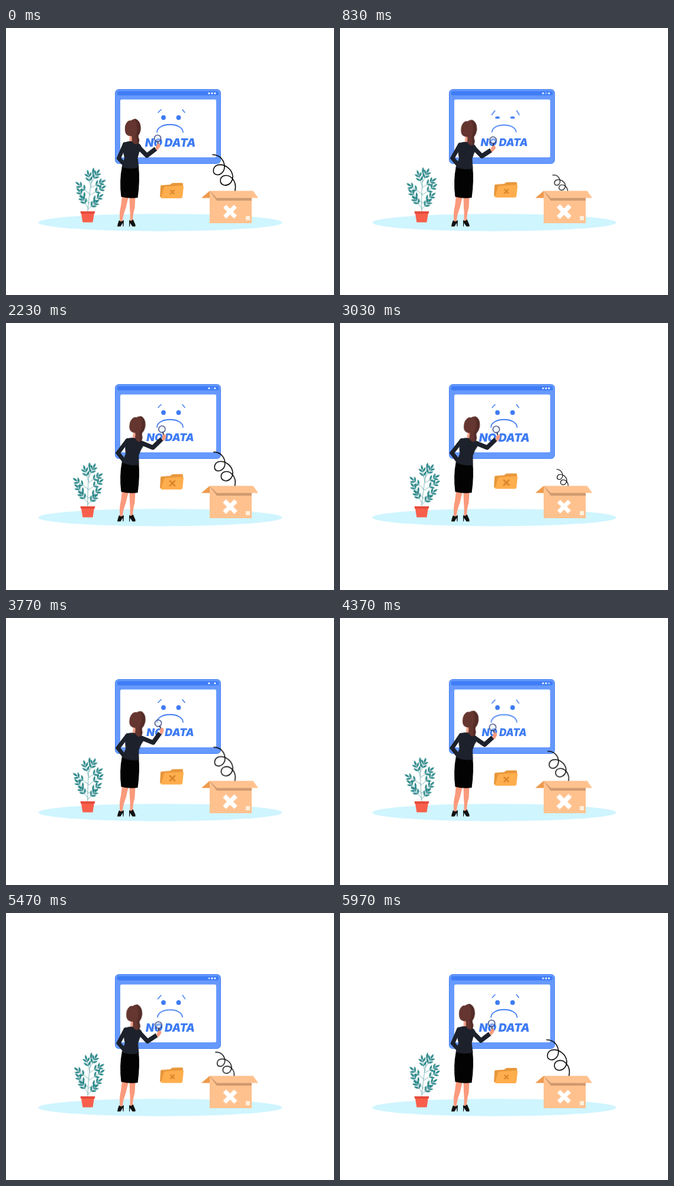
An HTML page that plays this animation: 554x450 px, repeating every 6.01 s.

```html
<!DOCTYPE html>
<html lang="en">
<head>
<meta charset="utf-8">
<title>No data</title>
<style>
:root { --t: 6.01s; --sine: cubic-bezier(.37, 0, .63, 1); }
html, body { margin: 0; width: 100%; height: 100%; overflow: hidden; background: #fff; }
svg { display: block; width: 554px; height: 450px; }

.quarter { animation: calc(var(--t) / 4) var(--sine) infinite alternate; }
.half { animation: calc(var(--t) / 2) var(--sine) infinite alternate; }
.body { animation: calc(var(--t) / 2) cubic-bezier(.61, 1, .88, 1) infinite alternate; }

#plant { animation-name: sway; transform-origin: 138px 309px; }
#label { animation-name: shrink; transform-origin: 277.5px 193px; }
#cross { animation-name: grow; transform-origin: 378.5px 309.5px; }
#folder { animation-name: lift; }
#folderCross { animation-name: swell; transform-origin: 281px 276.5px; }
#coil { animation-name: tilt; transform-origin: 383px 280px; }
#spring { animation: squeeze calc(var(--t) / 6) var(--sine) infinite alternate; transform-origin: 383px 280px; }
#mouth { animation-name: frown; transform-origin: 277px 172px; }
#brows { animation-name: droop; transform-origin: 280px 140px; }
.eye { animation: blink calc(var(--t) / 2) linear infinite; transform-box: fill-box; transform-origin: center; }
#torso { animation-name: lean; transform-origin: 209px 236px; }
#restArm { animation-name: rest; }
#sleeve { animation: reach var(--t) ease-in-out infinite; }
#hand { animation: search var(--t) ease-in-out infinite; }
#dots circle { animation: dimA calc(var(--t) / 4) linear infinite alternate; }
#dots circle:nth-child(2) { animation-name: dimB; }
#dots circle:nth-child(3) { animation-name: dimC; }

@keyframes sway { from { transform: rotate(8deg); } to { transform: rotate(-2.2deg); } }
@keyframes shrink { to { transform: scale(.885); } }
@keyframes grow { to { transform: scale(1.13); } }
@keyframes lift { to { transform: translateY(-7.5px); } }
@keyframes swell { to { transform: scale(1.4); } }
@keyframes squeeze { to { transform: scale(.5); stroke-width: 2.3; } }
@keyframes tilt { 0%, 67%, 100% { transform: rotate(0deg); } 33% { transform: rotate(-10deg); } }
@keyframes frown { 0%, 67%, 100% { transform: scale(1); } 33% { transform: scale(.92); } }
@keyframes droop { 0%, 67%, 100% { transform: none; } 33% { transform: translateY(3px) scale(1.03, 1.35); } }
@keyframes blink { 0%, 25.8% { transform: scaleY(1); } 29% { transform: scaleY(.1); } 33%, 100% { transform: scaleY(1); } }
@keyframes lean { from { transform: none; } to { transform: translateY(2.5px) rotate(7.3deg); } }
@keyframes rest {
  from { d: path("M200.5 196L190.5 219.5L200 230"); }
  to { d: path("M205.5 198L189 219L199 232"); }
}
@keyframes dimA { 0%, 40%, 100% { opacity: 1; } 27% { opacity: 0; } }
@keyframes dimB { 0%, 39%, 61%, 100% { opacity: 1; } 50% { opacity: 0; } }
@keyframes dimC { 0%, 63%, 100% { opacity: 1; } 77% { opacity: 0; } }
@keyframes reach {
  0%, 100% { d: path("M222 199L238 215L253 203.5"); }
  13.8% { d: path("M224 200L239.5 216L255 206"); }
  37.1% { d: path("M226 201L248 210L263 195.5"); }
  50.4% { d: path("M226.5 201L248.5 210L263 196"); }
  62.7% { d: path("M226 201L248.5 210L260 194"); }
  82.7% { d: path("M224.5 200L240 217L256 208"); }
}
@keyframes search {
  0%, 100% { transform: translate(257px, 199px) rotate(-4deg); }
  13.8% { transform: translate(259px, 202px) rotate(-2deg); }
  37.1% { transform: translate(267px, 191.5px) rotate(-16deg); }
  50.4% { transform: translate(267px, 192px) rotate(-14deg); }
  62.7% { transform: translate(263px, 189px) rotate(-27deg); }
  82.7% { transform: translate(260px, 204.5px) rotate(-5deg); }
}
</style>
</head>
<body>
<svg viewBox="0 0 554 450" fill="none" stroke-linecap="round" stroke-linejoin="round">
  <ellipse cx="260.5" cy="327.8" rx="206" ry="14.6" fill="#cff5ff"/>

  <!-- window -->
  <rect x="184.500" y="103.500" width="178" height="125" rx="6" fill="#6699fd" stroke="#4683f6"/>
  <rect x="187.500" y="106.500" width="172" height="7" rx="3.5" fill="#3f7df6"/>
  <rect x="193" y="120.500" width="162" height="97.5" rx="2.5" fill="#fff"/>
  <g id="dots" fill="#fff">
    <circle cx="343" cy="110" r="1.6"/><circle cx="348" cy="110" r="1.6"/><circle cx="353" cy="110" r="1.6"/>
  </g>
  <g stroke="#3f7cf3" stroke-width="1.8">
    <path id="brows" class="half" stroke-width="1.5" d="M257 142.500L262 137.500M298 137.500L302 142.500"/>
    <path id="mouth" class="half" d="M255 175.500C256 158.500 298 158.500 299 175.500"/>
  </g>
  <g fill="#3f7cf3">
    <circle class="eye" cx="266" cy="151" r="3.9"/><circle class="eye" cx="291.500" cy="151" r="3.9"/>
    <text id="label" class="quarter" x="277.500" y="199.800" text-anchor="middle" font-family="Inter, sans-serif" font-size="19" font-weight="900" font-style="italic">NO DATA</text>
  </g>

  <!-- folder -->
  <g id="folder" class="half">
    <path fill="#e8963a" d="M260 285L261 267Q261 265 263 265L277 264L281 261.300L297 261Q299 261 299 264L298 283Z"/>
    <path fill="#ffae4d" d="M267 269Q267.300 267.300 269 267.200L298 265.400Q300 265.300 300 267L298 285Q297.600 287 295 287L263 287Q261.500 287 262 285Z"/>
    <path id="folderCross" class="half" stroke="#d9822b" stroke-width="1.9" d="M278 273.500L284 279.500M284 273.500L278 279.500"/>
  </g>

  <!-- spring and box -->
  <g id="coil" class="half">
    <path id="spring" stroke="#000" stroke-width="1.6" d="M349 213.500C362 213.500 369 224 369 234C369 243 361 249 355 247C348 245 349 234 357 231C369 228 382 238 383 250C383 260 376 266 369 265C360 263 360 252 368 249C379 246 390 258 387 273L386 281"/>
  </g>
  <path fill="#ee9a4c" d="M344 274.500L330 286.500H345Z"/>
  <path fill="#ffc28f" d="M344 275H415V329H344Z"/>
  <path fill="#d09a70" d="M344 275L356 291H415V284Z"/>
  <path fill="#ffc28f" d="M344 274.500H417.500L426 286.500H356Z"/>
  <path fill="#fff0dc" d="M405 317H412V324H405Z"/>
  <path id="cross" class="quarter" stroke="#fff" stroke-width="7" stroke-linecap="butt" d="M369.500 300.500L387.500 318.500M387.500 300.500L369.500 318.500"/>

  <!-- plant -->
  <g id="plant" class="quarter" stroke="#2b8789" stroke-width=".6"></g>
  <path fill="#f8604c" d="M127 312H149L146.500 327.500H129.500Z"/>
  <path fill="#e64c3c" d="M125.500 309H150.500L149.500 313H126.500Z"/>

  <!-- woman -->
  <path fill="#fa9a7c" d="M196 284H207L202.500 303Q198 314 196.500 327H192.500Q191 310 194 300ZM208.500 284H218.500L217.500 303Q214 314 214 326H209.500Q210 312 209 302Z"/>
  <path fill="#111" d="M191 324Q195 328 199 323.500L198.500 334.500H197.500L197 328.500L193.500 334.500H188Q188.500 330 191 324ZM208 323.500Q211 327 214.500 322.500L218.500 331.500V334.500H213.500L209.500 328.500L209 334.500H208Z"/>
  <path fill="#030303" d="M196 233H224Q226.500 258 222.500 286Q209 288 194.500 284.500Q191 258 196 233Z"/>
  <path id="sleeve" stroke="#1c212b" stroke-width="7.5" stroke-linecap="butt" d="M222 199L238 215L253 203.500"/>
  <g id="hand">
    <path stroke="#2a3158" stroke-width="2" d="M0 2V-8"/>
    <circle cy="-13" r="5.6" fill="#dce9ff" fill-opacity=".4" stroke="#29366f" stroke-width="1.3"/>
    <path fill="#fa9a7c" d="M-5 4L-2.500 -2Q0 -5 3 -3Q5 0 2 3L-2 7Z"/>
  </g>
  <path id="restArm" class="body" stroke="#1c212b" stroke-width="7" stroke-linejoin="miter" d="M200.500 196L190.500 219.500L200 230"/>
  <g id="torso" class="body">
    <path fill="#f4a58e" d="M209 180H216V194H208Z"/>
    <path fill="#1c212b" d="M200 193Q210 189 221 192.500Q227 194.500 229 201Q224 210 222.500 219L224.500 235Q210 239 195.500 234.500L200 219Q197 207 197 197Q197 194 200 193Z"/>
    <path fill="#65352f" d="M211 156Q217 151 222 155Q228 160 227.500 170Q227 177 223.500 181Q223 184 225 188Q226 194 220 196.500Q212 194 212.500 188Q213 185 212 182Q204 183 201.500 176Q199 164 205 158Q208 155 211 156Z"/>
    <path fill="#532c28" d="M217 153Q220 153 222 155Q228 160 227.500 170Q227 177 223.500 181Q223 184 225 188Q226 194 220 196.500Q223 190 219 182Q225 166 217 153Z"/>
  </g>
</svg>
<script>
const plant = document.getElementById('plant');

function add(d, attrs = {}) {
  const el = document.createElementNS('http://www.w3.org/2000/svg', 'path');
  el.setAttribute('d', d);
  for (const key in attrs) el.setAttribute(key, attrs[key]);
  plant.append(el);
}

function leaf(x, y, angle, size) {
  add('M0 0Q5 -4 10 0Q5 4 0 0Z', {
    fill: '#2b8789', stroke: 'none',
    transform: `translate(${x} ${y}) rotate(${angle}) scale(${size} ${size * 0.85})`
  });
}

// Each branch: foot height, then tip x and y.
const branches = [
  [306, 148, 294], [303, 127, 290], [296, 153, 283], [294, 121, 279],
  [282, 155, 268], [280, 119, 268], [269, 153, 258], [267, 131, 249],
  [260, 144, 245]
];

add('M138 309Q136 275 138 243');
leaf(138, 246, -92, 1.15);

for (const [foot, x, y] of branches) {
  const dx = x - 137.5, dy = y - foot;
  const angle = Math.atan2(dy, dx) * 180 / Math.PI;
  add(`M137.5 ${foot}L${x} ${y}`);
  leaf(x, y, angle, 1);
  for (const part of [0.5, 0.85]) {
    for (const side of [-1, 1]) {
      leaf(137.5 + dx * part, foot + dy * part, angle + side * 40, 0.95);
    }
  }
}
</script>
</body>
</html>
```
